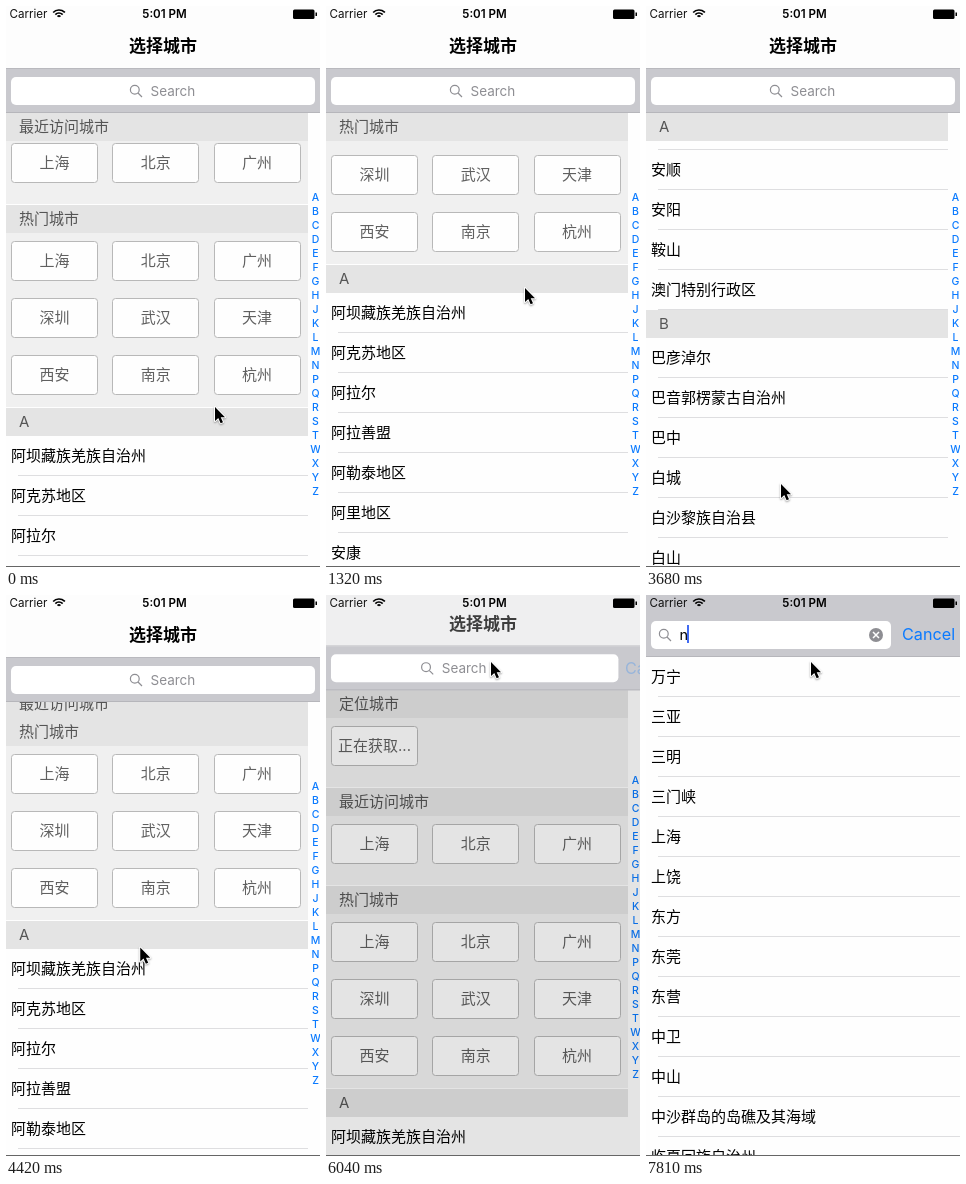
These frames come from a looping animation (314 by 561 pixels, 8 s). An HTML page with a canvas:

```html
<!DOCTYPE html>
<html lang="zh">
<head>
<meta charset="utf-8">
<style>
  html, body { margin: 0; width: 100%; height: 100%; overflow: hidden; background: #fefefe; }
  canvas { display: block; width: 314px; height: 561px; }
</style>
</head>
<body>
<canvas id="stage"></canvas>
<script>
const W = 314, H = 561, LOOP = 8000, TICK = 147.2;
const LIST_W = 302, HEADER_H = 28, ROW_H = 40;
const BAR = '#c9c9ce', BLUE = '#0a7aff', GRAY = '#8e8e93', WHITE = '#fefefe';
const FONTS = 'Inter, "Noto Sans CJK SC", "Noto Sans CJK", sans-serif';

const canvas = document.getElementById('stage');
const ctx = canvas.getContext('2d');
const ratio = window.devicePixelRatio || 1;
canvas.width = W * ratio;
canvas.height = H * ratio;
ctx.scale(ratio, ratio);

const grid = (title, names) => ({
  title, names: names.split(' '), grid: true,
});
const rows = (title, names) => ({ title, names: names.split(' ') });
const sections = [
  grid('定位城市', '正在获取...'),
  grid('最近访问城市', '上海 北京 广州'),
  grid('热门城市', '上海 北京 广州 深圳 武汉 天津 西安 南京 杭州'),
  rows('A', '阿坝藏族羌族自治州 阿克苏地区 阿拉尔 阿拉善盟 阿勒泰地区 阿里地区 安康 安庆 安顺 安阳 鞍山 澳门特别行政区'),
  rows('B', '巴彦淖尔 巴音郭楞蒙古自治州 巴中 白城 白沙黎族自治县 白山 白银 百色 蚌埠 包头 宝鸡 保定'),
];
let sectionTop = 0;
for (const s of sections) {
  s.y = sectionTop;
  s.height = s.grid
    ? 98 + (Math.ceil(s.names.length / 3) - 1) * 57 - (s.names.length > 3 ? 9 : 0)
    : HEADER_H + s.names.length * ROW_H;
  sectionTop += s.height;
}
const results = '万宁 三亚 三明 三门峡 上海 上饶 东方 东莞 东营 中卫 中山 中沙群岛的岛礁及其海域 临夏回族自治州'.split(' ');

// Keys are [tick, value...], joined by straight lines.
const scrollKeys = [[0, 104], [5, 205], [9, 247], [13, 330], [15, 390], [17, 420],
  [20, 800], [22, 930], [23, 920], [25, 710], [27, 490], [30, 180], [33, 0], [54, 0]];
const cursorKeys = [[0, 209, 401], [6, 201, 300], [9, 199, 282], [13, 180, 440], [15, 172, 440],
  [17, 168, 392], [20, 150, 255], [22, 140, 258], [25, 135, 478], [27, 135, 510],
  [31, 134, 300], [35, 133, 5], [39, 165, 67], [54, 165, 67]];

function sample(keys, tick) {
  const i = Math.max(1, keys.findIndex(k => k[0] >= tick));
  const a = keys[i - 1], b = keys[i];
  const p = (tick - a[0]) / (b[0] - a[0]);
  return a.slice(1).map((v, j) => v + (b[j + 1] - v) * p);
}

function rect(x, y, w, h, color) {
  ctx.fillStyle = color;
  ctx.fillRect(x, y, w, h);
}

function roundRect(x, y, w, h, r, fill, stroke) {
  ctx.beginPath();
  ctx.roundRect(x, y, w, h, r);
  ctx.fillStyle = fill;
  ctx.fill();
  if (stroke) {
    ctx.strokeStyle = stroke;
    ctx.lineWidth = 1;
    ctx.stroke();
  }
}

// Text is centred vertically on y.
function text(str, x, y, size, color, align = 'left', weight = 400) {
  ctx.font = `${weight} ${size}px ${FONTS}`;
  ctx.textAlign = align;
  ctx.fillStyle = color;
  ctx.fillText(str, x, y + size * 0.365);
}

function strokePath(color, width, build) {
  ctx.strokeStyle = color;
  ctx.lineWidth = width;
  ctx.beginPath();
  build();
  ctx.stroke();
}

function drawRows(names, y, right) {
  names.forEach((name, i) => {
    const top = y + i * ROW_H;
    text(name, 5, top + 20, 15, '#000');
    rect(12, top + ROW_H - 1, right - 12, 1, '#dedee0');
  });
}

function drawButtons(names, y) {
  names.forEach((name, i) => {
    const x = 5 + (i % 3) * 101.25, top = y + Math.floor(i / 3) * 57;
    roundRect(Math.round(x) + 0.5, top + 0.5, 86, 39, 3, WHITE, '#b8b8b8');
    text(name, x + 43.5, top + 20, 15, '#606060', 'center');
  });
}

function drawList(top, scroll) {
  ctx.save();
  ctx.beginPath();
  ctx.rect(0, top, W, H - top);
  ctx.clip();
  ctx.translate(0, top);
  rect(0, 0, W, H, WHITE);
  for (const s of sections) {
    const y = Math.round(s.y - scroll);
    if (s.grid) {
      rect(0, y, LIST_W, s.height - 1, '#f0f0f0');
      drawButtons(s.names, y + 36);
    } else {
      drawRows(s.names, y + HEADER_H, LIST_W);
    }
  }
  for (const s of sections) {
    const y = Math.round(s.y - scroll);
    const pinned = Math.max(y, Math.min(0, y + s.height - HEADER_H));
    rect(0, pinned, LIST_W, HEADER_H, '#e4e4e4');
    text(s.title, 13, pinned + 14, 15, '#555');
  }
  ctx.restore();
}

function drawIndex(y) {
  [...'ABCDEFGHJKLMNPQRSTWXYZ'].forEach((letter, i) =>
    text(letter, 309.5, y + i * 14, 10.5, BLUE, 'center', 500));
}

function drawStatusBar() {
  text('Carrier', 3.5, 8, 11.6, '#111');
  text('5:01 PM', 158.5, 8, 11.6, '#000', 'center', 600);
  for (const r of [2, 5, 8])
    strokePath('#000', 1.7, () => ctx.arc(53, 12, r, -Math.PI * 0.76, -Math.PI * 0.24));
  roundRect(287, 3.5, 21.5, 9.5, 1.5, '#000');
  rect(309.5, 6.5, 1.5, 3.5, '#000');
}

function drawSearchBar(p, typed, caret) {
  const top = 63 - 45 * p, mid = top + 22;
  const iconX = 130 - 111 * p, textX = 144.5 - 111 * p;
  rect(0, 0, W, top + 44, BAR);
  rect(0, top + 43, W, 1, '#b6b6bb');

  ctx.globalAlpha = 1 - p;
  rect(0, 0, W, top, '#fdfdfd');
  rect(0, top - 1, W, 1, '#b9b9be');
  text('选择城市', 157, 40 - 45 * p, 17, '#000', 'center', 600);
  ctx.globalAlpha = 1;

  roundRect(5, top + 8, 304 - 64 * p, 28, 5, '#fff');
  strokePath(GRAY, 1.2, () => {
    ctx.arc(iconX - 1.2, mid - 1.2, 4.4, 0, Math.PI * 2);
    ctx.moveTo(iconX + 2, mid + 2);
    ctx.lineTo(iconX + 6, mid + 6);
  });
  if (typed) {
    text('n', textX, mid, 14.5, '#000');
    roundRect(223, mid - 7, 14, 14, 7, GRAY);
    strokePath('#fff', 1.5, () => {
      for (const d of [-1, 1]) {
        ctx.moveTo(230 - 3 * d, mid - 3);
        ctx.lineTo(230 + 3 * d, mid + 3);
      }
    });
  } else {
    text('Search', textX, mid, 13.5, GRAY);
  }
  ctx.globalAlpha = caret;
  rect(typed ? 41 : 33, mid - 10, 2, 18, '#426bf2');
  ctx.globalAlpha = p;
  text('Cancel', 256 + 58 * (1 - p), mid - 0.5, 16.2, BLUE);
  ctx.globalAlpha = 1;
}

function drawCursor(x, y) {
  ctx.save();
  ctx.translate(x, y);
  ctx.beginPath();
  for (const [px, py] of [[0, 0], [0, 14], [3.3, 11], [5.6, 16.2], [8, 15.2], [5.7, 10.2], [10, 10.2]])
    ctx.lineTo(px, py);
  ctx.closePath();
  ctx.lineJoin = 'round';
  ctx.strokeStyle = '#fff';
  ctx.lineWidth = 2;
  ctx.shadowColor = 'rgba(0,0,0,.35)';
  ctx.shadowBlur = 2;
  ctx.shadowOffsetY = 1;
  ctx.stroke();
  ctx.shadowColor = 'transparent';
  ctx.fillStyle = '#000';
  ctx.fill();
  ctx.restore();
}

function caretAlpha(tick) {
  if (tick < 43) return 0;
  if (tick >= 50) return 1;
  return [1, 1, 0.8, 0.4][tick - 43] ?? 0.08;
}

function draw(time) {
  // The screen refreshes in even steps, so motion is held between ticks.
  const tick = Math.floor(time / TICK + 0.06);
  const linear = Math.min(1, Math.max(0, (tick - 40) / 3));
  const p = linear * linear * (3 - 2 * linear);
  const typed = tick >= 53;
  const top = Math.round(107 - 45 * p);

  if (typed) {
    rect(0, 0, W, H, WHITE);
    drawRows(results, top, W);
  } else {
    drawList(top, sample(scrollKeys, tick)[0]);
    drawIndex(191 - 22 * p);
    rect(0, top, W, H - top, `rgba(0,0,0,${0.4 * p})`);
  }
  drawSearchBar(p, typed, caretAlpha(tick));
  drawStatusBar();
  rect(0, H - 1, W, 1, '#666');
  drawCursor(...sample(cursorKeys, tick));
}

const start = performance.now();
function frame() {
  draw((performance.now() - start) % LOOP);
  requestAnimationFrame(frame);
}
frame();
</script>
</body>
</html>
```
